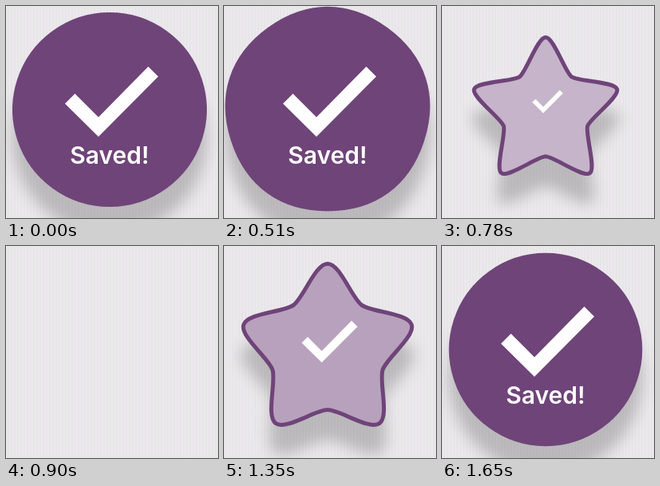
Write an HTML page that moves like this. It is 266x266 px and loops after 1.68 s.

```html
<!DOCTYPE html>
<html lang="en">
<head>
<meta charset="utf-8">
<title>Saved</title>
<style>
  html, body { margin: 0; width: 100%; height: 100%; overflow: hidden; }
  body { background: repeating-linear-gradient(90deg, #ebe9ec 0 2px, #e8e5e9 2px 4px); }
  svg { display: block; width: 100vw; height: 100vh; }
  #shape {
    stroke: #6f4479; stroke-width: 5; stroke-linejoin: round;
    filter: drop-shadow(0 35px 9px rgba(0, 0, 0, .2));
  }
  #check, #label { fill: #fff; }
  #label { font: 600 30px Inter, "Open Sans", sans-serif; text-anchor: middle; }
</style>
</head>
<body>
<svg viewBox="0 0 266 266">
  <path id="shape"/>
  <path id="check" d="M74 122.5 86.5 110 116 139.5 178.5 76 191 88.5 116 164Z"/>
  <text id="label" x="130" y="198">Saved!</text>
</svg>
<script>
const LOOP = 1680, STEP = 30, CX = 130;
const DARK = [111, 68, 121], LIGHT = [220, 208, 222];

const ramp = (t, from, to) => Math.min(1, Math.max(0, (t - from) / (to - from)));
const smooth = p => p * p * (3 - 2 * p);
const backOut = (p, s) => 1 + (s + 1) * (p - 1) ** 3 + s * (p - 1) ** 2;

// Slow swelling that begins late in one loop and ends early in the next.
const swell = t => Math.sin(Math.PI / 2 * ramp(t < 990 ? t + LOOP : t, 1500, LOOP + 570));

function leaving(t) {
  const gone = ramp(t, 570, 720);
  return {
    radius: (115 + 12 * swell(t)) * (1 - ramp(t, 570, 900) ** 3),
    star: Math.min(1, .03 * ramp(t, 0, 570) + ramp(t, 570, 810) ** 3),
    fill: 1 - ramp(t, 660, 810),
    fade: 1 - ramp(t, 810, 900),
    check: 1 - ramp(t, 570, 810) ** 3,
    label: 1 - .48 * gone,
    labelFade: 1 - gone
  };
}

function entering(t) {
  const shown = ramp(t, 1410, 1590), pop = ramp(t, 1290, 1620);
  return {
    radius: 115 * (1 - (1 - ramp(t, 1080, 1560)) ** 4) + 12 * swell(t),
    star: 1 - smooth(ramp(t, 1230, 1500)),
    fill: ramp(t, 1230, 1590),
    fade: ramp(t, 1080, 1260),
    check: pop && backOut(pop, 1.2),
    label: .62 + .38 * shown,
    labelFade: shown
  };
}

// Ten anchors whose handles shrink to nothing as the circle becomes a star.
function outline(r, star) {
  const cy = 130 + 5 * star;
  const anchors = Array.from({ length: 11 }, (_, i) => {
    const angle = (i * 36 - 90) * Math.PI / 180;
    const c = Math.cos(angle), s = Math.sin(angle);
    const d = i % 2 ? r * (1 - .59 * star) : r;
    const h = .2112 * r * (1 - star * star);
    const x = CX + d * c, y = cy + d * s;
    return { p: [x, y], before: [x + s * h, y - c * h], after: [x - s * h, y + c * h] };
  });
  let d = "M" + anchors[0].p;
  for (let i = 1; i <= 10; i++) {
    d += "C" + [anchors[i - 1].after, anchors[i].before, anchors[i].p].join(" ");
  }
  return d + "Z";
}

const [shape, check, label] = ["shape", "check", "label"].map(id => document.getElementById(id));

function show(el, visible) {
  el.style.visibility = visible ? "visible" : "hidden";
}

function scale(el, k, x, y) {
  el.setAttribute("transform", `translate(${x} ${y}) scale(${k}) translate(${-x} ${-y})`);
  show(el, k > 0);
}

function draw(t) {
  const pose = t < 990 ? leaving(t) : entering(t);
  show(shape, pose.radius > 0);
  shape.setAttribute("d", outline(pose.radius, pose.star));
  shape.style.fill = `rgb(${LIGHT.map((v, i) => Math.round(v + (DARK[i] - v) * pose.fill))})`;
  shape.style.opacity = pose.fade;
  scale(check, pose.check, 132.5, 120);
  scale(label, pose.label, 130, 187);
  label.style.opacity = pose.labelFade;
}

const start = performance.now();
function tick() {
  const t = (performance.now() - start) % LOOP;
  draw(Math.floor(t / STEP) * STEP);
  requestAnimationFrame(tick);
}
tick();
</script>
</body>
</html>
```
